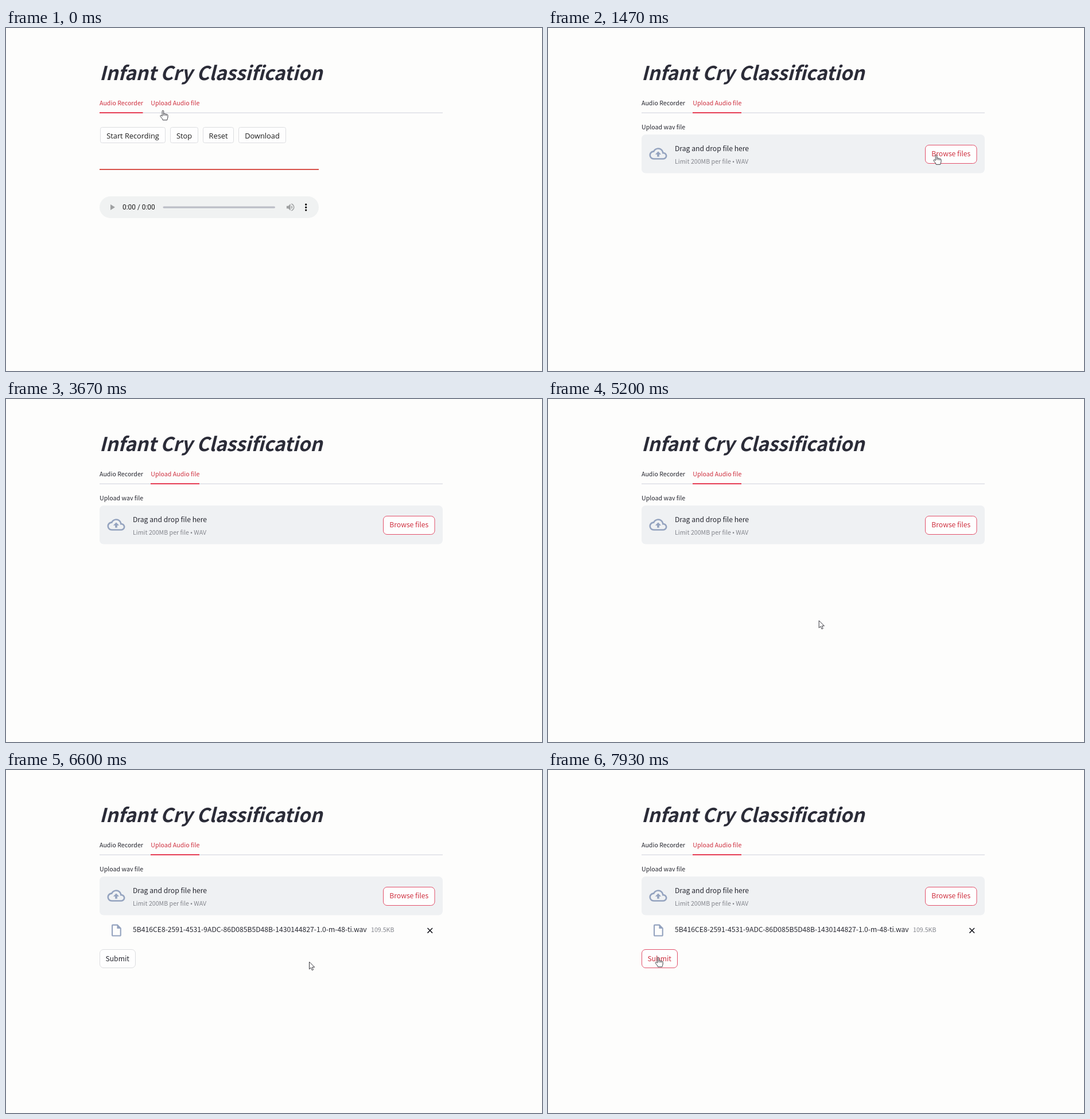
Recreate the animation shown at these times as an HTML page. Size 934x599 px, loop 8 s.

```html
<!DOCTYPE html>
<html lang="en">
<head>
<meta charset="utf-8">
<title>Infant Cry Classification</title>
<style>
  html, body { margin: 0; width: 100%; height: 100%; overflow: hidden; background: #fdfdfc; }
  svg { display: block; width: 100vw; height: 100vh; }
  text { font: 12.17px "Noto Sans CJK JP", "Noto Sans CJK SC", "Open Sans", sans-serif; fill: #262730; white-space: pre; }
  .small { font-size: 10.65px; }
  .muted { fill: #84868d; }
  .title { font-size: 33.5px; font-weight: 700; font-style: italic; letter-spacing: -.005em; fill: #2b2c38; }
  .recorder text { font: 12.8px "Open Sans", "Noto Sans", sans-serif; fill: #1c1c1c; }
  .recorder .time { font: 11.9px Roboto, sans-serif; }
  .button rect { fill: #fefefe; stroke: #dcdde0; }
  .hot text, text.hot { fill: #cf3140; }
  .hot rect { stroke: #e2506a; }
  .icon { fill: #94a3bf; fill-rule: evenodd; }
  .cursor path { fill: #fff; stroke: #3a3a40; stroke-width: 1; stroke-linejoin: round; }
</style>
</head>
<body>
<svg viewBox="0 0 934 599">
  <text class="title" x="163" y="91">Infant Cry Classification</text>
  <text id="recorderTab" class="small" x="163" y="134.5">Audio Recorder</text>
  <text class="small hot" x="252.3" y="134.5">Upload Audio file</text>
  <rect x="163" y="147.4" width="598" height="1.5" fill="#dedfe6"/>
  <rect id="underline" y="147" height="2" fill="#e63c53"/>

  <g id="recorder" class="recorder">
    <g id="recorderButtons" class="button"></g>
    <rect x="163" y="246" width="382" height="2" fill="#d8524a"/>
    <rect x="163" y="294" width="382" height="38" rx="19" fill="#f0f2f2"/>
    <path d="M182 308v10l8-5z" fill="#9fa1a2"/>
    <text class="time" x="203" y="317.2">0:00 / 0:00</text>
    <rect x="273.5" y="311.5" width="195.500" height="3.2" rx="1.6" fill="#bcbec7"/>
    <path transform="translate(486.7 304) scale(.75)" fill="#9fa1a2" d="M3 9v6h4l5 5V4L7 9H3zm13.500 3c0-1.770-1.020-3.290-2.500-4.030v8.050c1.480-.73 2.500-2.250 2.500-4.020zM14 3.230v2.060c2.890.86 5 3.540 5 6.710s-2.110 5.850-5 6.710v2.060c4.010-.91 7-4.490 7-8.770s-2.990-7.860-7-8.770z"/>
    <path d="M522.700 308.300v0M522.700 313.200v0M522.700 318.100v0" stroke="#111" stroke-width="3.400" stroke-linecap="round"/>
  </g>

  <g id="upload">
    <text class="small" x="163" y="176.700">Upload wav file</text>
    <rect x="163" y="186" width="598" height="67.500" rx="7" fill="#eff1f3"/>
    <path class="icon" transform="translate(176.500 204) scale(1.29)" d="M19.350 10.040C18.670 6.590 15.640 4 12 4 9.110 4 6.600 5.640 5.350 8.040 2.340 8.360 0 10.910 0 14c0 3.310 2.690 6 6 6h13c2.760 0 5-2.240 5-5 0-2.640-2.050-4.780-4.650-4.960zM19 18H6c-2.210 0-4-1.790-4-4s1.790-4 4-4h.71C7.370 7.690 9.480 6 12 6c3.040 0 5.500 2.460 5.500 5.500v.5H19c1.660 0 3 1.340 3 3s-1.340 3-3 3zM8 13h2.550v3h2.900v-3H16l-4-4z"/>
    <text x="221" y="215.200">Drag and drop file here</text>
    <text class="small muted" x="221" y="237">Limit 200MB per file • WAV</text>
    <g id="browse" class="button">
      <rect x="657.500" y="204.500" width="89.500" height="32" rx="6.500"/>
      <text x="668.300" y="224.300">Browse files</text>
    </g>
  </g>

  <g id="file">
    <path class="icon" transform="translate(179.800 267.500) scale(1.05)" d="M14 2H6c-1.100 0-1.990.9-1.990 2L4 20c0 1.100.89 2 1.990 2H18c1.100 0 2-.9 2-2V8l-6-6zM6 20V4h7v5h5v11H6z"/>
    <text x="221" y="283.300">5B416CE8-2591-4531-9ADC-86D085B5D48B-1430144827-1.0-m-48-ti.wav</text>
    <text class="small muted" x="636" y="283.300">109.5KB</text>
    <path d="M734.500 276l8.600 8.600m0-8.600l-8.600 8.600" stroke="#1e1f26" stroke-width="1.600"/>
  </g>
  <g id="submit" class="button">
    <rect x="163.500" y="313.500" width="62" height="32" rx="6.500"/>
    <text x="173.500" y="334">Submit</text>
  </g>

  <g id="cursor" class="cursor">
    <path id="arrow" d="M.5.500V13.300L3.400 10.600 5.300 15.200 7.500 14.300 5.600 9.800H9.700z"/>
    <g id="hand">
      <path d="M-1.300 10V1.200C-1.300-.4 1.200-.4 1.200 1.200V6C1.800 5 3.600 5.200 3.700 6.500 4.500 5.600 6 5.900 6.200 7.100 7.200 6.500 8.500 7.100 8.500 8.400V12C8.500 14 7.200 14.800 7.200 16.800H-.3C-.5 14.500-3.200 12.500-4.400 10.300-5.100 8.800-3.400 8-2.500 8.900z"/>
      <path d="M1.200 6V9M3.700 6.500V9.300M6.200 7.100V9.500"/>
    </g>
  </g>
</svg>
<script>
const LOOP = 8000;
const $ = id => document.getElementById(id);

// label, left edge, width
const recorderButtons = [
  ["Start Recording", 164, 114], ["Stop", 286, 49], ["Reset", 343, 54], ["Download", 405, 83],
];
$("recorderButtons").innerHTML = recorderButtons.map(([label, x, width]) =>
  `<rect x="${x + .5}" y="173.500" width="${width - 1}" height="27" rx="3"/>
   <text x="${x + width / 2}" y="192.500" text-anchor="middle">${label}</text>`).join("");

// time, x, y of the pointer's hot spot
const pointerPath = [
  [0, 273.500, 144], [950, 273.500, 144], [1400, 676.500, 221.500], [1850, 676.500, 221.500],
  [2450, 91, 326], [4500, 12, 449], [5150, 470, 388], [5650, 528, 334.500],
  [6700, 528, 334.500], [7250, 113, 330], [7550, 113, 330], [7900, 191.700, 327],
];

const clamp = v => Math.min(1, Math.max(0, v));
const ease = v => v * v * (3 - 2 * v);
const mix = (a, b, v) => a + (b - a) * v;
const progress = (t, start, end) => ease(clamp((t - start) / (end - start)));
const show = (id, visible) => { $(id).style.display = visible ? "" : "none"; };
const inside = (x, y, left, top, right, bottom) => x >= left && x <= right && y >= top && y <= bottom;

function pointerAt(t) {
  const next = pointerPath.findIndex(([time]) => time > t);
  if (next < 0) return pointerPath.at(-1).slice(1);
  const [t0, x0, y0] = pointerPath[next - 1], [t1, x1, y1] = pointerPath[next];
  const v = progress(t, t0, t1);
  return [mix(x0, x1, v), mix(y0, y1, v)];
}

function draw(t) {
  const uploading = t >= 480;
  show("recorder", !uploading);
  show("upload", uploading);
  show("file", t >= 5500);
  show("submit", t >= 6350);
  $("recorderTab").classList.toggle("hot", !uploading);

  const slide = progress(t, 540, 800);
  $("underline").setAttribute("x", mix(163, 252, slide));
  $("underline").setAttribute("width", mix(75.500, 85, slide));

  const [x, y] = pointerAt(t);
  const overBrowse = t < 1900 && inside(x, y, 657, 204, 747, 237);
  const overSubmit = t >= 6350 && inside(x, y, 163, 313, 226, 346);
  $("browse").classList.toggle("hot", overBrowse || t >= 1400);
  $("submit").classList.toggle("hot", overSubmit);

  const hand = t < 980 || overBrowse || overSubmit;
  show("hand", hand);
  show("arrow", !hand);
  show("cursor", t < 2450 || t >= 4500);
  $("cursor").setAttribute("transform", `translate(${x} ${y})`);
}

function tick(now) {
  draw(now % LOOP);
  requestAnimationFrame(tick);
}
draw(0);
requestAnimationFrame(tick);
</script>
</body>
</html>
```
